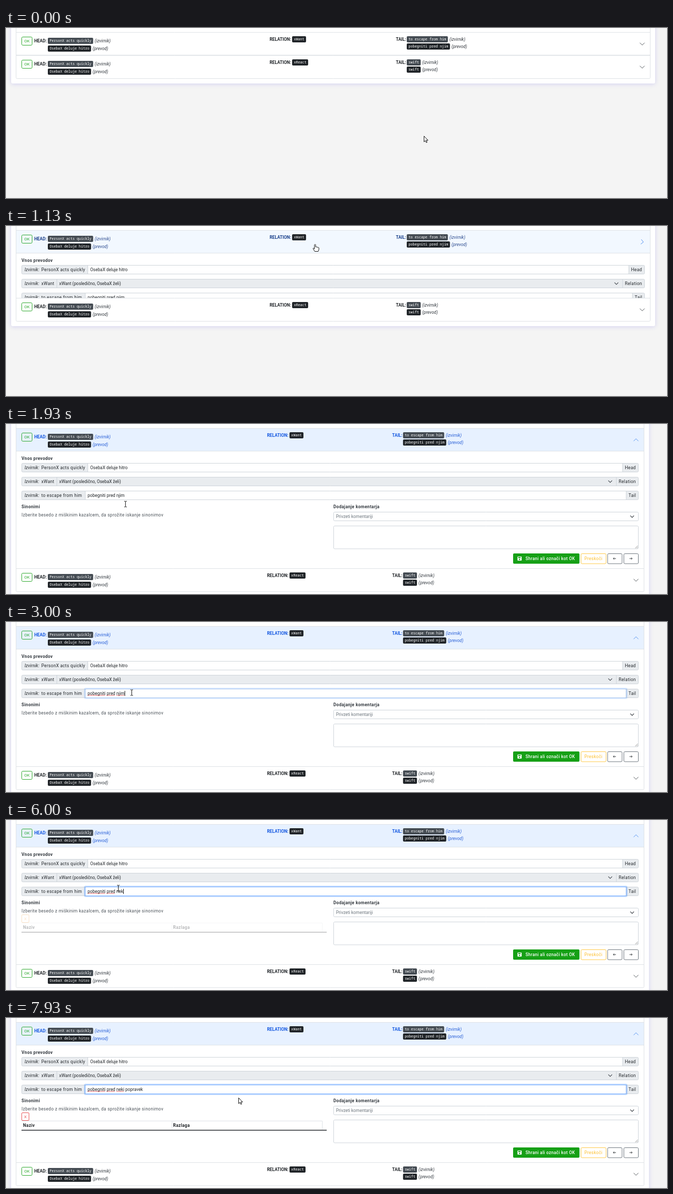
An HTML page with a canvas that plays this animation: 1280x331 px, repeating every 8 s.

```html
<!DOCTYPE html>
<html lang="sl">
<head>
<meta charset="utf-8">
<title>Vnos prevodov</title>
<style>
  html, body { margin: 0; width: 100%; height: 100%; overflow: hidden; background: #f4f4f4; }
  canvas { display: block; }
</style>
</head>
<body>
<canvas id="stage" width="1280" height="331"></canvas>
<script>
const ctx = document.getElementById('stage').getContext('2d');
const LOOP = 8000;
const SANS = 'Roboto, sans-serif', MONO = '"Noto Sans Mono", monospace';
const INK = '#212529', LINE = '#dee2e6', FIELD = '#ced4da', ADDON = '#e9ecef';
const SPACED = 0.36;

const clamp = v => Math.max(0, Math.min(1, v));
const mix = (a, b, p) => a + (b - a) * p;
const mixColor = (a, b, p) => `rgb(${a.map((v, i) => Math.round(mix(v, b[i], p)))})`;

// CSS "ease": cubic-bezier(.25, .1, .25, 1)
function ease(x) {
  const bezier = (a, b, s) => 3 * a * s * (1 - s) ** 2 + 3 * b * s * s * (1 - s) + s ** 3;
  let lo = 0, hi = 1;
  for (let i = 0; i < 20; i++) {
    const mid = (lo + hi) / 2;
    if (bezier(0.25, 0.25, mid) < x) lo = mid; else hi = mid;
  }
  return bezier(0.1, 1, lo);
}

// ---- drawing helpers ----
function text(str, x, middle, { color = INK, style = '', size = 8.4, spacing = 0, font = SANS, align = 'left' } = {}) {
  ctx.font = `${style} ${size}px ${font}`;
  ctx.letterSpacing = spacing + 'px';
  ctx.textAlign = align;
  ctx.fillStyle = color;
  ctx.fillText(str, x, Math.round(middle + 3));
  return ctx.measureText(str).width;
}

function box(x, y, right, bottom, { fill, stroke, radius = 2, width = 1 } = {}) {
  ctx.beginPath();
  ctx.roundRect(x, y, right - x, bottom - y, radius);
  if (fill) { ctx.fillStyle = fill; ctx.fill(); }
  if (stroke) { ctx.strokeStyle = stroke; ctx.lineWidth = width; ctx.stroke(); }
}

function line(points, color, width = 1) {
  ctx.beginPath();
  for (let i = 0; i < points.length; i += 2) ctx.lineTo(points[i], points[i + 1]);
  ctx.strokeStyle = color;
  ctx.lineWidth = width;
  ctx.stroke();
}

function chevron(x, y, size, color, angle = 0, width = 0.85) {
  ctx.save();
  ctx.translate(x, y);
  ctx.rotate(angle);
  line([-size, -size / 2, 0, size / 2, size, -size / 2], color, width);
  ctx.restore();
}

function pill(str, x, middle, fill) {
  const right = x + str.length * 4.05 + 6.8, top = Math.round(middle - 6);
  box(x, top, right, top + 12, { fill });
  text(str, x + 3.4, middle - 0.6, { color: '#fff', style: '500', size: 6.75, font: MONO });
  return right;
}

function pillPair(source, translation, x, middle, gap, color) {
  const note = { color, style: 'italic' };
  text('(izvirnik)', pill(source, x, middle, '#454c53') + 3, middle, note);
  text('(prevod)', pill(translation, x, middle + gap, INK) + 3, middle + gap, note);
}

// ---- page parts ----
function row(top, narrow, relation, tail, tailTranslation, color, noteColor) {
  const label = { color, style: 'bold' };
  const relationX = 510.5 - narrow * 0.42, tailX = 755 - narrow * 0.6;
  box(30.5, top + 9, 50.5, top + 25, { stroke: '#2ca82c' });
  text('OK', 40.5, top + 16.5, { color: '#2ca82c', size: 8, align: 'center' });
  text('HEAD:', 54.7, top + 16.4, label);
  pillPair('PersonX acts quickly', 'OsebaX deluje hitro', 81, top + 16.4, 15, noteColor);
  text('RELATION:', relationX, top + 13.4, label);
  pill(relation, relationX + 43.5, top + 13.4, INK);
  text('TAIL:', tailX, top + 13.4, label);
  pillPair(tail, tailTranslation, tailX + 21, top + 13.4, 14, noteColor);
}

function inputGroup(y, right, source, split, value, label, labelX, disabled) {
  box(30.5, y, right, y + 17, { fill: ADDON });
  if (!disabled) {
    ctx.fillStyle = '#fff';
    ctx.fillRect(split, y, labelX - split, 17);
  }
  box(30.5, y, right, y + 17, { stroke: FIELD });
  line([split, y, split, y + 17], FIELD);
  line([labelX, y, labelX, y + 17], FIELD);
  text('Izvirnik:', 36, y + 8.4, { style: 'italic', spacing: 0.1 });
  text(source, 68.5, y + 8.4, { spacing: SPACED });
  text(value, split + 4.6, y + 8.4);
  text(label, labelX + 4.5, y + 8.4, { spacing: SPACED });
}

const TYPED = [[0, 'njim'], [5730, 'n'], [5870, 'ne'], [5930, 'nek'], [6070, 'neki'], [6200, 'neki '],
  [6330, 'neki p'], [6530, 'neki po'], [6670, 'neki popr'], [6730, 'neki popra'],
  [6930, 'neki poprav'], [7070, 'neki popravek']];
const lastBefore = (list, t) => list.findLast(item => item[0] <= t);

function squiggle(from, to, y) {
  const points = [];
  for (let x = from, i = 0; x <= to; x += 1.2, i++) points.push(x, y + (i % 2 ? 0.6 : -0.6));
  line(points, '#e33', 0.8);
}

function tailField(t, right) {
  const y = 130.5, x = 153.5, labelX = right - 23.5;
  const prefix = 'pobegniti pred ', ending = lastBefore(TYPED, t)[1];
  inputGroup(y, right, 'to escape from him', x, prefix + ending, 'Tail', labelX, false);
  if (t < 2930) return;

  const focus = clamp((t - 2890) / 200);
  box(x - 1.2, y - 1.2, labelX + 1.2, y + 18.2, { stroke: `rgba(13,110,253,${0.27 * focus})`, width: 2.4 });
  box(x, y, labelX, y + 17, { stroke: mixColor([206, 212, 218], [134, 183, 254], focus) });

  const start = x + 4.6;
  ctx.font = '8.4px ' + SANS;
  ctx.letterSpacing = '0px';
  const measure = s => ctx.measureText(s).width;
  const wordX = start + measure(prefix);
  squiggle(start, start + measure('pobegniti'), 143);
  squiggle(start + measure('pobegniti '), wordX - 2, 143);
  const endX = wordX + measure(ending);
  if (t < 5730) squiggle(wordX, endX, 143);
  if (t >= 6200) squiggle(wordX, wordX + measure('neki'), 143);

  if (t >= 4400 && t < 5730) {
    ctx.fillStyle = '#1a78d6';
    ctx.fillRect(wordX - 0.3, 133, endX - wordX + 0.6, 12);
    text(ending, wordX, y + 8.4, { color: '#fff' });
  } else if (t < 7600) {
    line([endX + 0.5, 134, endX + 0.5, 144], '#000', 0.9);
  }
}

function synonymTable(t) {
  const p = clamp((t - 5850) / 400);
  if (!p) return;
  ctx.globalAlpha = 0.5 - Math.cos(p * Math.PI) / 2;
  const red = p < 1 ? '#f3a24a' : '#ea5455';
  box(30.5, 184.5, 44.5, 199.5, { stroke: red, radius: 1.5 });
  text('X', 37.5, 192, { color: red, size: 8, align: 'center' });
  for (const x of [321.5, 612.5]) line([x, 200.5, x, 217], LINE);
  line([30, 200.5, 612.5, 200.5], LINE);
  line([30, 218.5, 621, 218.5], INK, 1.6);
  const bold = { style: 'bold', spacing: SPACED };
  text('Naziv', 33, 209, bold);
  text('Razlaga', 323.5, 209, bold);
  ctx.globalAlpha = 1;
}

function saveIcon(x, y) {
  box(x, y, x + 8, y + 8, { fill: '#fff', radius: 1 });
  ctx.fillStyle = '#16a016';
  ctx.fillRect(x + 1.5, y + 1, 4.5, 2);
  ctx.beginPath();
  ctx.arc(x + 4, y + 5.6, 1.3, 0, 7);
  ctx.fill();
}

function arrowButton(x, y, direction) {
  box(x, y, x + 28, y + 19.5, { stroke: '#6c757d' });
  const mid = x + 13.5, cy = y + 9.5, tip = mid + 2.6 * direction;
  line([mid - 2.6 * direction, cy, tip, cy], INK, 0.9);
  line([tip - 1.9 * direction, cy - 1.9, tip, cy, tip - 1.9 * direction, cy + 1.9], INK, 0.9);
}

function body(t, right, narrow) {
  const bold = { style: 'bold', spacing: SPACED, color: '#343a40' };
  text('Vnos prevodov', 30, 67, bold);
  inputGroup(76.5, right, 'PersonX acts quickly', 158.5, 'OsebaX deluje hitro', 'Head', right - 30.5, false);
  inputGroup(103.5, right, 'xWant', 98.5, 'xWant (posledično, OsebaX želi)', 'Relation', right - 42.5, true);
  chevron(right - 54.5, 112, 3.6, '#343a40', 0, 1.1);
  tailField(t, right);

  text('Sinonimi', 30, 161, bold);
  text('Izberite besedo z miškinim kazalcem, da sprožite iskanje sinonimov', 30, 177, { spacing: SPACED, color: '#495057' });
  synonymTable(t);

  const left = 640 - narrow / 2;
  text('Dodajanje komentarja', left, 161, bold);
  box(left + 0.5, 171.5, right, 188.5, { stroke: FIELD });
  text('Privzeti komentariji', left + 5, 180, { color: '#6c757d' });
  chevron(right - 12, 180.2, 3.6, '#343a40', 0, 1.1);
  box(left + 0.5, 198.5, right, 243, { stroke: FIELD });
  line([right - 6, 242, right - 1, 237], '#777', 0.8);
  line([right - 3, 242, right - 1, 240], '#777', 0.8);

  box(right - 242.5, 252, right - 114, 272, { fill: '#16a016' });
  saveIcon(right - 234, 258);
  text('Shrani ali označi kot OK', right - 218.5, 262, { color: '#fff', style: '500', spacing: 0.3 });
  box(right - 111, 252.5, right - 62.5, 272, { stroke: '#ffc845' });
  text('Preskoči', right - 104.5, 262, { color: '#fcbf2d', spacing: SPACED });
  arrowButton(right - 59.5, 252.5, -1);
  arrowButton(right - 28, 252.5, 1);
}

// ---- pointer ----
const POINTER = [
  [0, 809, 210, 'arrow'], [130, 690, 157, 'arrow'], [200, 636, 161, 'arrow'], [330, 636, 161, 'arrow'],
  [600, 606, 70, 'hand'], [730, 598, 35, 'hand'], [1130, 598, 35, 'hand'], [1200, 588, 42, 'hand'],
  [1270, 562, 60, 'arrow'], [1330, 522, 85, 'beam'], [1400, 430, 120, 'arrow'], [1470, 300, 160, 'arrow'],
  [1530, 216, 178, 'beam'], [1600, 216, 178, 'beam'], [2200, 243, 137, 'beam'], [3000, 243, 137, 'beam'],
  [3130, 227, 138, 'beam'], [3270, 227, 138, 'beam'], [3470, 214, 138, 'beam'], [3730, 214, 138, 'beam'],
  [3930, 217, 138, 'beam'], [4600, 217, 138, 'beam'], [4730, 217, 132, 'beam'], [7730, 217, 132, 'beam'],
  [7930, 450, 155, 'arrow'], [LOOP, 450, 155, 'arrow']];
const SHAPES = {
  arrow: new Path2D('M0 0V11.2L2.6 8.8L4.3 12.6L6 11.9L4.4 8.1H7.7Z'),
  hand: new Path2D('M-1.2 1Q0 -.8 1.2 1V5.4Q2.4 4.6 3.3 5.7Q4.6 5.1 5.4 6.2Q7 5.8 7.4 7.2V10.4L6 14H-.6L-3.6 9.2Q-4.4 7.6 -3 7.5L-1.2 9.2Z'),
  beam: new Path2D('M-2.5 -5.5H-.7L0 -5L.7 -5.5H2.5M0 -5V5M-2.5 5.5H-.7L0 5L.7 5.5H2.5'),
};

function pointer(t) {
  const next = POINTER.findIndex(key => key[0] > t);
  const a = POINTER[next - 1], b = POINTER[next];
  const p = (t - a[0]) / (b[0] - a[0]);
  ctx.save();
  ctx.translate(mix(a[1], b[1], p) + 0.5, mix(a[2], b[2], p) + 0.5);
  ctx.strokeStyle = '#111';
  ctx.lineWidth = 1;
  if (a[3] !== 'beam') { ctx.fillStyle = '#fff'; ctx.fill(SHAPES[a[3]]); }
  ctx.stroke(SHAPES[a[3]]);
  ctx.restore();
}

function draw(t) {
  const opened = ease(clamp((t - 1047) / 350));
  const active = clamp((t - 1050) / 150);
  const rowTop = 8.5, bodyTop = 53.5, secondTop = bodyTop + Math.round(228 * opened);
  const cardBottom = secondTop + 54.5;
  const narrow = cardBottom > 300 ? 12 : 0; // page scrollbar takes its room
  const edge = 1248 - narrow, fieldRight = edge - 11.5;

  ctx.fillStyle = '#f4f4f4';
  ctx.fillRect(0, 0, 1280, 331);
  ctx.save();
  ctx.shadowColor = 'rgba(90,80,230,.22)';
  ctx.shadowBlur = 9;
  ctx.shadowOffsetY = 1;
  box(10, -30, edge + 9, cardBottom, { fill: '#fff', radius: 3 });
  ctx.restore();

  ctx.fillStyle = mixColor([255, 255, 255], [231, 241, 255], active);
  ctx.fillRect(20, 9, edge - 20, 44);
  row(rowTop, narrow, 'xWant', 'to escape from him', 'pobegniti pred njim',
    mixColor([33, 37, 41], [20, 88, 225], active), mixColor([50, 54, 60], [40, 95, 215], active));
  // The icon swaps to its blue version at once, then turns.
  const iconColor = active > 0 ? '#3f85ee' : '#343a40';
  chevron(edge - 16, 31, 4.6, iconColor, -Math.PI * ease(clamp((t - 1075) / 200)));

  if (opened > 0) {
    ctx.save();
    ctx.beginPath();
    ctx.rect(0, bodyTop, 1280, secondTop - bodyTop);
    ctx.clip();
    body(t, fieldRight, narrow);
    ctx.restore();
  }

  line([19.5, rowTop, edge, rowTop], LINE);
  line([19.5, 52.8, edge, 52.8], LINE);
  line([19.5, secondTop, edge, secondTop], LINE);
  row(secondTop, narrow, 'xReact', 'swift', 'swift', INK, '#343a40');
  chevron(edge - 16, secondTop + 22.5, 4.6, '#343a40');
  box(19.5, -10, edge - 0.5, secondTop + 45, { stroke: LINE });
  pointer(t);
}

function tick() {
  const now = performance.now() % LOOP;
  const step = Math.floor((now + 5) * 0.015);
  draw(Math.round(step / 0.15) * 10 % LOOP);
  requestAnimationFrame(tick);
}
tick();
</script>
</body>
</html>
```
